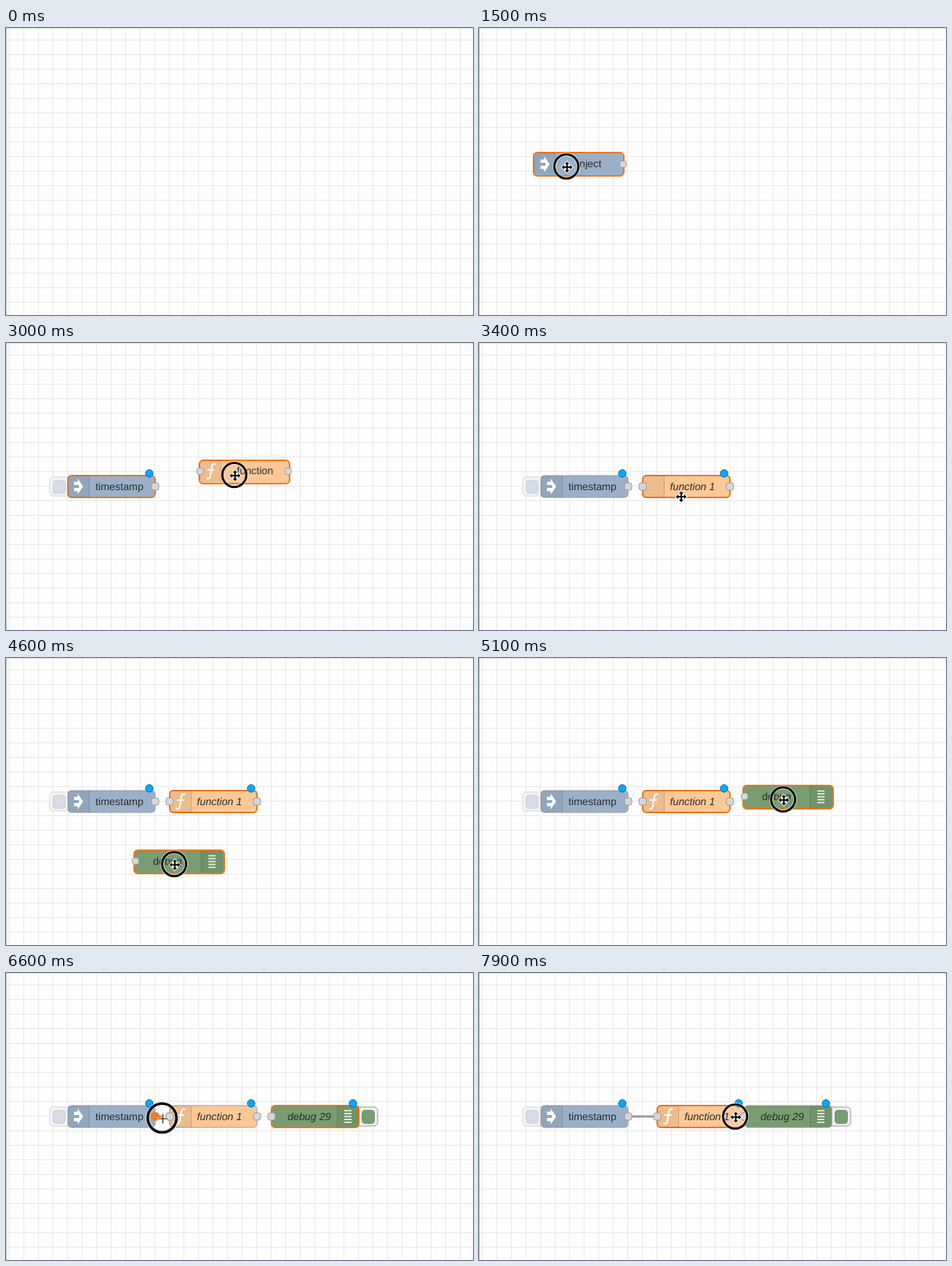
An HTML page that plays this animation: 642x394 px, repeating every 8 s.

```html
<!DOCTYPE html>
<html lang="en">
<head>
<meta charset="utf-8">
<title>Building a flow</title>
<style>
html, body { margin: 0; width: 100%; height: 100%; overflow: hidden; background: #fdfdfd; }
svg { display: block; width: 642px; height: 394px; }
text { font: 14.3px "Liberation Sans", Arial, sans-serif; fill: #2b2b2b; text-rendering: geometricPrecision; }
.named { font-style: italic; }
.center { text-anchor: middle; }

.inject { fill: #9bb0c8; }
.function { fill: #fcc896; }
.debug { fill: #789d71; }
.body { stroke: #999; stroke-width: 1; }
.dragged .body, .picked { stroke: #ee7418; stroke-width: 2; }
.port { fill: #d6d6d6; stroke: #999; }
.dragged .port { fill: #ededed; }
.shade { fill: #000; fill-opacity: .06; }
.divider { stroke: #000; stroke-opacity: .14; }
.wire { stroke: #999; stroke-width: 3; }
.hot { fill: #ff7a10; stroke: #ff7a10; }

/* Timeline: 1% = 80ms */
.step { animation: 8s step-end infinite; }
.move { animation: 8s linear infinite; }

#injectDrag { animation-name: showInjectDrag; }
#injectDrag .move { animation-name: moveInject; }
#functionDrag { animation-name: showFunctionDrag; }
#functionDrag .move { animation-name: moveFunction; }
#debugDrag { animation-name: showDebugDrag; }
#debugDrag .move { animation-name: moveDebug; }
#timestamp { animation-name: showTimestamp; }
#timestamp .body { animation-name: pickTimestamp; }
#functionNode { animation-name: showFunction; }
#functionNode .nudge { animation-name: nudge; }
#functionNode .body { animation-name: pickFunction; }
#functionNode .late { animation-name: showIcon; }
#debugNode { animation-name: showDebug; }
#debugNode .body { animation-name: pickDebug; }
#wire { animation-name: showWire; }
#wiring { animation-name: showWiring; }
#wiring .move { animation-name: stretch; }
#pointer { animation-name: showPointer; }
#pointer > .move { animation-name: movePointer; }
#ring { animation-name: showRing; }
#ring .move { animation-name: press; }
#arrows { animation-name: showArrows; }
#cross { animation-name: showCross; }

@keyframes showInjectDrag { 0%, 21.25%, 100% { opacity: 0 } 13.7% { opacity: 1 } }
@keyframes showFunctionDrag { 0%, 41.2%, 100% { opacity: 0 } 31.9% { opacity: 1 } }
@keyframes showDebugDrag { 0%, 67.5%, 100% { opacity: 0 } 56.9% { opacity: 1 } }
@keyframes showTimestamp { 0% { opacity: 0 } 21.25%, 100% { opacity: 1 } }
@keyframes showFunction { 0% { opacity: 0 } 41.2%, 100% { opacity: 1 } }
@keyframes showIcon { 0% { opacity: 0 } 43.7%, 100% { opacity: 1 } }
@keyframes showDebug { 0% { opacity: 0 } 67.5%, 100% { opacity: 1 } }
@keyframes showWire { 0% { opacity: 0 } 86.2%, 100% { opacity: 1 } }
@keyframes showWiring { 0%, 86.2%, 100% { opacity: 0 } 81.2% { opacity: 1 } }
@keyframes showPointer {
  0%, 23.75%, 49.9% { opacity: 0 }
  13.7%, 31.9%, 56.9%, 100% { opacity: 1 }
}
@keyframes showRing {
  0%, 21.25%, 41.2%, 67.5%, 86.2% { opacity: 0 }
  13.7%, 31.9%, 56.9%, 81.9%, 94%, 100% { opacity: 1 }
}
@keyframes showArrows { 0%, 90% { opacity: 1 } 72.5% { opacity: 0 } }
@keyframes showCross { 0%, 90%, 100% { opacity: 0 } 72.5% { opacity: 1 } }

@keyframes pickTimestamp {
  0% { stroke: #ee7418; stroke-width: 2 }
  41.2%, 100% { stroke: #999; stroke-width: 1 }
}
@keyframes pickFunction {
  0%, 94%, 100% { stroke: #ee7418; stroke-width: 2 }
  67.5% { stroke: #999; stroke-width: 1 }
}
@keyframes pickDebug {
  0% { stroke: #ee7418; stroke-width: 2 }
  94%, 100% { stroke: #999; stroke-width: 1 }
}

@keyframes moveInject {
  0%, 13.75% { transform: translate(-35px, 203px) }
  15% { transform: translate(7px, 193px) }
  16.25% { transform: translate(47px, 181px) }
  17.5% { transform: translate(69px, 173px) }
  18.75% { transform: translate(75px, 171px) }
  21.25%, 100% { transform: translate(85px, 180px) }
}
@keyframes moveFunction {
  0%, 32.5% { transform: translate(85px, 373px) }
  33.75% { transform: translate(230px, 270px) }
  35% { transform: translate(288px, 166px) }
  36.25% { transform: translate(282px, 152px) }
  38.75% { transform: translate(250px, 170px) }
  41.25%, 100% { transform: translate(229px, 190px) }
}
@keyframes moveDebug {
  0%, 57.5% { transform: translate(175px, 264px) }
  58.75% { transform: translate(285px, 251px) }
  60% { transform: translate(357px, 233px) }
  61.25% { transform: translate(365px, 206px) }
  62.5% { transform: translate(364px, 184px) }
  63.75% { transform: translate(363px, 175px) }
  67.5%, 100% { transform: translate(365px, 179px) }
}
@keyframes movePointer {
  0%, 13.75% { transform: translate(10px, 222px) }
  15% { transform: translate(52px, 212px) }
  16.25% { transform: translate(92px, 200px) }
  17.5% { transform: translate(114px, 192px) }
  18.75% { transform: translate(120px, 190px) }
  21.25% { transform: translate(130px, 199px) }
  23.75% { transform: translate(-20px, 222px) }
  31.8% { transform: translate(190px, 360px) }
  32.5% { transform: translate(215px, 319px) }
  33.75% { transform: translate(310px, 235px) }
  35% { transform: translate(336px, 186px) }
  36.25% { transform: translate(330px, 172px) }
  38.75% { transform: translate(298px, 190px) }
  41.25%, 43.75% { transform: translate(277px, 210px) }
  46.25% { transform: translate(231px, 194px) }
  47.5%, 50% { transform: translate(205px, 194px) }
  56.8%, 57.5% { transform: translate(230px, 283px) }
  58.75% { transform: translate(340px, 270px) }
  60% { transform: translate(412px, 252px) }
  61.25% { transform: translate(420px, 225px) }
  62.5% { transform: translate(419px, 203px) }
  63.75% { transform: translate(418px, 194px) }
  67.5% { transform: translate(420px, 198px) }
  71.25% { transform: translate(412px, 204px) }
  75% { transform: translate(330px, 222px) }
  78.75% { transform: translate(232px, 205px) }
  81.25% { transform: translate(206px, 198px) }
  82.5% { transform: translate(214.5px, 199px) }
  85% { transform: translate(226px, 198px) }
  87.5% { transform: translate(235px, 204px) }
  90% { transform: translate(285px, 212px) }
  93.75%, 95% { transform: translate(332px, 198px) }
  98.75%, 100% { transform: translate(352px, 197px) }
}
@keyframes press {
  0%, 81.2% { transform: scale(1) }
  81.9% { transform: scale(1.25) }
  82.5% { transform: scale(1.2) }
  83.75%, 93.7% { transform: scale(1) }
  94% { transform: scale(1.25) }
  95.6%, 100% { transform: scale(1) }
}
@keyframes stretch {
  0%, 81.25% { transform: scaleX(0) }
  82.5% { transform: scaleX(.5) }
  85%, 100% { transform: scaleX(1) }
}
@keyframes nudge {
  0% { transform: translate(0, 0) }
  96.8%, 100% { transform: translate(20px, 0) }
}
</style>
</head>
<body>
<svg viewBox="0 0 642 394">
  <defs>
    <pattern id="grid" x="4" y="16" width="20" height="20" patternUnits="userSpaceOnUse">
      <path d="M0 0H20V1H1V20H0Z" fill="#e7e7e7" shape-rendering="crispEdges"/>
    </pattern>
    <rect id="port" class="port" x="-5" y="-5" width="10" height="10" rx="3"/>
    <rect id="smallPort" class="port" x="-4.5" y="-4.5" width="9" height="9" rx="3"/>
    <circle id="dot" r="5.2" fill="#0af" stroke="#17629c"/>
    <g id="cap">
      <path class="shade" d="M5 0H30V30H5Q0 30 0 25V5Q0 0 5 0Z"/>
      <path class="divider" d="M29.5 0V30"/>
    </g>
    <path id="injectIcon" fill="#fff" d="M-6.5-6.5h5V-11L6 0-1.5 11V6.5h-5V2h7v-4h-7Z"/>
    <path id="functionIcon" fill="none" stroke="#fff" stroke-width="2"
      d="M6.5-9.5C3-11.5 1.5-9.5 1-6L-1 6.5C-1.5 10-3 11-6 9.5M-5-2H4.5"/>
    <path id="debugIcon" stroke="#fff" stroke-width="1.4" d="M-5-8H5M-5-4H5M-5 0H5M-5 4H5M-5 8H5"/>
  </defs>

  <rect width="642" height="394" fill="#fdfdfd"/>
  <rect width="642" height="394" fill="url(#grid)"/>
  <path d="M0 0H642V1H0Z" fill="#dcdcdc"/>
  <path d="M0 0H1V394H0Z" fill="#bdbdbd"/>

  <path id="wire" class="wire step" d="M205 197H245"/>

  <g id="timestamp" class="step">
    <g transform="translate(85 182)">
      <rect x="-25" y="2" width="32" height="26" rx="5" fill="#f4f4f5" stroke="#d3d3d6"/>
      <rect x="-20.5" y="6.5" width="17" height="18" rx="4" fill="#d7dbe5" stroke="#ccd0da"/>
      <rect class="body inject step" width="120" height="30" rx="5"/>
      <use href="#cap"/>
      <use href="#injectIcon" x="15" y="15"/>
      <text x="38" y="20">timestamp</text>
      <use href="#port" x="120" y="15"/>
      <use href="#dot" x="112" y="-3"/>
    </g>
  </g>

  <g id="functionNode" class="step">
    <g class="nudge step">
      <g transform="translate(225 182)">
        <rect class="body function step" width="120" height="30" rx="5"/>
        <use href="#cap"/>
        <use class="late step" href="#functionIcon" x="15" y="15"/>
        <text class="named" x="37.5" y="20">function 1</text>
        <use href="#port" y="15"/>
        <use href="#port" x="120" y="15"/>
        <use href="#dot" x="112" y="-3"/>
      </g>
    </g>
  </g>

  <g id="debugNode" class="step">
    <g transform="translate(365 182)">
      <rect x="114" y="2" width="32" height="26" rx="5" fill="#eee" stroke="#999"/>
      <rect class="debug" x="124.5" y="6.5" width="17" height="18" rx="4" stroke="#6d8c68"/>
      <rect class="body debug step" width="120" height="30" rx="5"/>
      <use href="#cap" transform="translate(120 0) scale(-1 1)"/>
      <use href="#debugIcon" x="105" y="15"/>
      <text class="named" x="22" y="20">debug 29</text>
      <use href="#port" y="15"/>
      <use href="#dot" x="112" y="-3"/>
    </g>
  </g>

  <g id="wiring" class="step">
    <g transform="translate(205 197)">
      <path class="wire hot move" d="M0 0H20"/>
      <use href="#port"/>
      <rect class="hot" x="-5" y="-5" width="10" height="10" rx="3"/>
      <use href="#port" x="20"/>
    </g>
  </g>

  <g id="injectDrag" class="dragged step">
    <g class="move">
      <rect class="body inject" width="124" height="32" rx="5"/>
      <use href="#cap"/>
      <use href="#injectIcon" x="16" y="16"/>
      <text class="center" x="76.5" y="20">inject</text>
      <use href="#smallPort" x="123" y="16"/>
    </g>
  </g>

  <g id="functionDrag" class="dragged step">
    <g class="move">
      <rect class="body function" width="124" height="32" rx="5"/>
      <use href="#cap"/>
      <use href="#functionIcon" x="16" y="15"/>
      <text class="center" x="76.5" y="19">function</text>
      <use href="#smallPort" x="1" y="15"/>
      <use href="#smallPort" x="122" y="15"/>
    </g>
  </g>

  <g id="debugDrag" class="dragged step">
    <g class="move">
      <rect class="body debug" width="124" height="32" rx="5"/>
      <use href="#cap" transform="translate(122 1) scale(-1 1)"/>
      <use href="#debugIcon" x="107" y="15.5"/>
      <text class="center" x="46" y="20">debug</text>
      <use href="#smallPort" x="2" y="15"/>
    </g>
  </g>

  <g id="pointer" class="step">
    <g class="move">
      <g id="ring" class="step">
        <g class="move" fill="none">
          <circle r="16.5" stroke="#fff" stroke-width="5" stroke-opacity=".6"/>
          <circle r="16.5" stroke="#000" stroke-width="3"/>
        </g>
      </g>
      <g transform="translate(1 1)" stroke="#fff" paint-order="stroke">
        <path id="arrows" class="step" stroke-width="2"
          d="M0-7.5 3-4H1V-1H4V-3L7.5 0 4 3V1H1V4H3L0 7.5-3 4H-1V1H-4V3L-7.5 0-4-3V-1H-1V-4H-3Z"/>
        <path id="cross" class="step" stroke-width="1.5"
          d="M-.6-6.5H.6V-.6H6.5V.6H.6V6.5H-.6V.6H-6.5V-.6H-.6Z"/>
      </g>
    </g>
  </g>
</svg>
</body>
</html>
```
